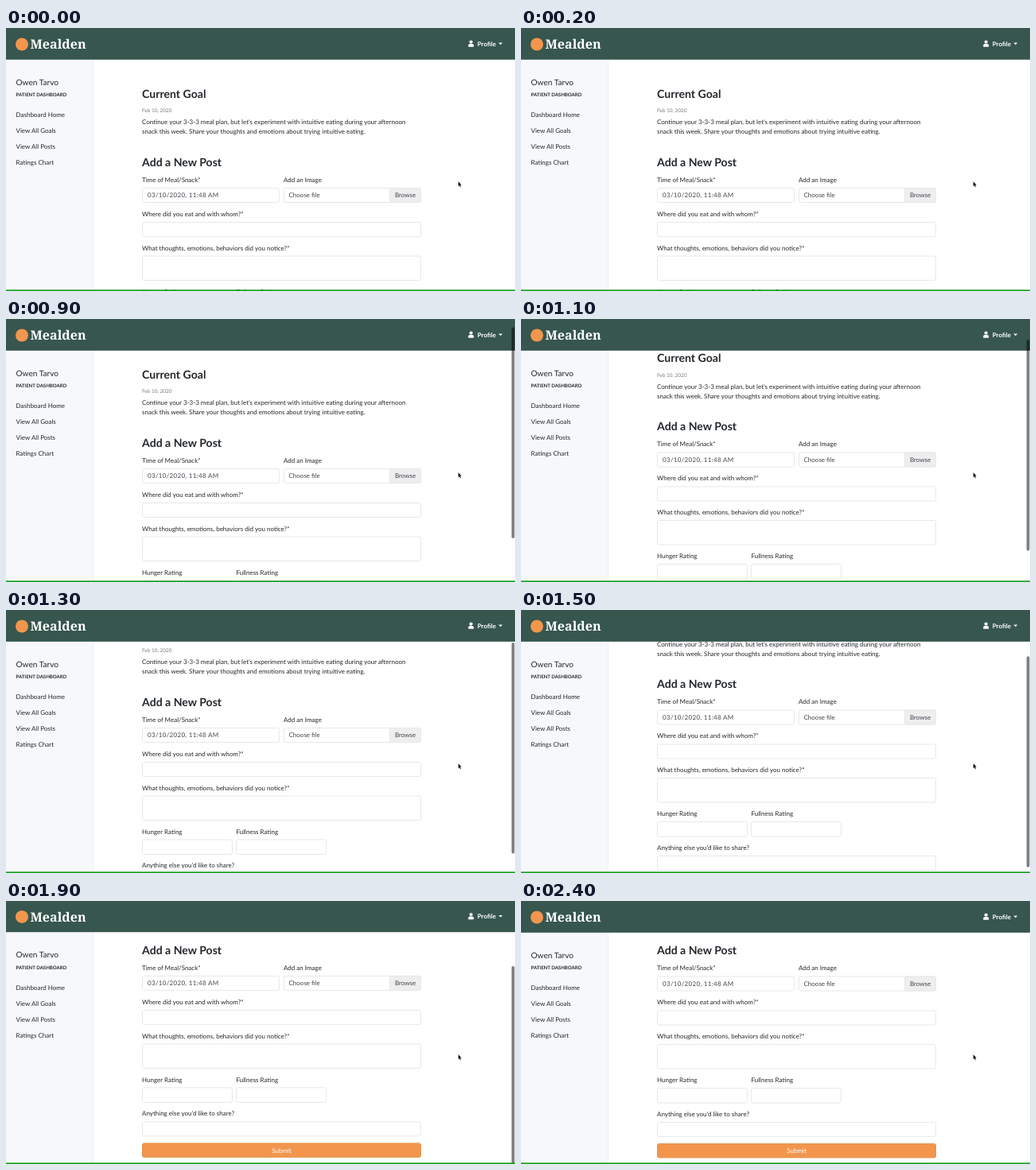
An HTML page with a canvas for the animation above (2600 ms loop, 640x331 px).

```html
<!DOCTYPE html>
<html lang="en">
<head>
<meta charset="utf-8">
<title>Patient dashboard</title>
<style>
  html, body { margin: 0; width: 100%; height: 100%; overflow: hidden; background: #fff; }
  canvas { display: block; width: 640px; height: 331px; }
</style>
</head>
<body>
<canvas id="stage"></canvas>
<script>
const W = 640, H = 331, LOOP = 2600, STEP = 100;
const REM = 8;
const VIEW = 347, MAX_SCROLL = 106.5;
const INK = '#24282c', MUTED = '#40464c', LINE = '#e6e8ea';
const ORANGE = '#f2964e', GREEN = '#36564e';

const canvas = document.getElementById('stage');
const ctx = canvas.getContext('2d');
const dpr = window.devicePixelRatio || 1;
canvas.width = W * dpr;
canvas.height = H * dpr;
ctx.textRendering = 'geometricPrecision';

// Scroll path: time, position, speed per step
const path = [
  [600, 0, 0], [700, 1, 2], [1100, 33.5, 10.5],
  [1500, 75.5, 13.5], [1700, MAX_SCROLL, 15]
];

function scrollAt(t) {
  if (t <= path[0][0]) return 0;
  for (let i = 1; i < path.length; i++) {
    const [t0, p0, v0] = path[i - 1], [t1, p1, v1] = path[i];
    if (t > t1) continue;
    const n = (t1 - t0) / STEP, u = (t - t0) / (t1 - t0), w = 1 - u;
    return w * w * ((1 + 2 * u) * p0 + u * n * v0) +
           u * u * ((1 + 2 * w) * p1 - w * n * v1);
  }
  return MAX_SCROLL;
}

// Elastic overshoot at the end of the page
function bounceAt(t) {
  return t < 1700 || t >= 2400 ? 0 : 2 * Math.exp((1700 - t) / 170);
}

function barAlpha(t) {
  return t < 800 ? 0 : Math.max(0, Math.min(1, (2400 - t) / 300));
}

// y is the middle of the capital letters
function text(str, x, y, { size = REM, color = INK, weight = 400,
    family = 'Lato, sans-serif', align = 'left', spacing = 0 } = {}) {
  ctx.font = `${weight} ${size}px ${family}`;
  ctx.fillStyle = color;
  ctx.textAlign = align;
  ctx.letterSpacing = spacing + 'px';
  ctx.fillText(str, x, y + size * 0.36);
}

function rect(x, y, w, h, color) {
  ctx.fillStyle = color;
  ctx.fillRect(x, y, w, h);
}

function box(x, y, w, h, fill = '#fff', stroke = LINE) {
  ctx.beginPath();
  ctx.roundRect(x + 0.5, y + 0.5, w - 1, h - 1, 2);
  ctx.fillStyle = fill;
  ctx.fill();
  ctx.lineWidth = 1;
  ctx.strokeStyle = stroke;
  ctx.stroke();
}

function polygon(points, fill, stroke) {
  ctx.beginPath();
  points.forEach(([x, y]) => ctx.lineTo(x, y));
  ctx.closePath();
  if (stroke) {
    ctx.lineWidth = 1.2;
    ctx.strokeStyle = stroke;
    ctx.stroke();
  }
  ctx.fillStyle = fill;
  ctx.fill();
}

function disc(x, y, r, color) {
  ctx.beginPath();
  ctx.arc(x, y, r, 0, Math.PI * 2);
  ctx.fillStyle = color;
  ctx.fill();
}

function drawMain() {
  const title = { size: 14.1, weight: 700 };
  text('Current Goal', 171, 82.9, title);
  text('Feb 10, 2020', 171, 103.8, { size: 6.45, color: '#787c80' });
  text("Continue your 3-3-3 meal plan, but let's experiment with intuitive eating during your afternoon", 171, 118.5);
  text('snack this week. Share your thoughts and emotions about trying intuitive eating.', 171, 130.5);

  text('Add a New Post', 171, 168.7, title);
  text('Time of Meal/Snack*', 171, 190.9);
  text('Add an Image', 349, 190.9);
  box(171, 201, 173, 19);
  text('03/10/2020, 11:48 AM', 178, 210.6, { color: MUTED, spacing: 0.3 });
  box(349, 201, 173, 19);
  box(482, 201, 40, 19, '#eeeeef');
  text('Choose file', 355.5, 210.6, { color: MUTED });
  text('Browse', 502, 210.6, { color: MUTED, align: 'center' });

  text('Where did you eat and with whom?*', 171, 233.9);
  box(171, 244, 351, 19);
  text('What thoughts, emotions, behaviors did you notice?*', 171, 276.9);
  box(171, 286.5, 351, 31.5);

  text('Hunger Rating', 171, 331.8);
  text('Fullness Rating', 289.5, 331.8);
  box(171, 341.5, 114, 19.5);
  box(289, 341.5, 114, 19.5);
  text("Anything else you'd like to share?", 171, 374.5);
  box(171, 384.5, 351, 19);

  box(171, 411.5, 351, 18.5, ORANGE, '#e3944f');
  text('Submit', 346.5, 421, { color: '#fff', align: 'center' });
}

function drawSidebar() {
  rect(0, 39, 109, H, '#f7f8fa');
  rect(109, 39, 1, H, '#eeeff1');
  text('Owen Tarvo', 12.5, 68.3, { size: 10.1 });
  text('PATIENT DASHBOARD', 12.5, 84.3, { size: 6.05, weight: 700 });
  ['Dashboard Home', 'View All Goals', 'View All Posts', 'Ratings Chart']
    .forEach((item, i) => text(item, 12.5, 109.3 + i * 20.05));
}

function drawHeader() {
  rect(0, -4, W, 43.8, GREEN);
  disc(20, 20.5, 8, ORANGE);
  text('Mealden', 30.5, 20.5, { size: 16.1, weight: 700, color: '#fff', family: '"Noto Serif", serif' });

  disc(584.7, 17.6, 2.1, '#fff');
  ctx.beginPath();
  ctx.roundRect(581.2, 20, 7, 3.8, [2, 2, 0.8, 0.8]);
  ctx.fill();
  text('Profile', 592.7, 20.2, { weight: 700, color: '#fff' });
  polygon([[619.3, 18.6], [624.3, 18.6], [621.8, 21.2]], '#fff');
}

function drawScrollbar(scroll, alpha) {
  if (!alpha) return;
  const ratio = VIEW / (VIEW + MAX_SCROLL);
  ctx.globalAlpha = alpha;
  ctx.beginPath();
  ctx.roundRect(635.7, 0.5 + scroll * ratio, 3.7, VIEW * ratio, 1.8);
  ctx.fillStyle = 'rgba(0,0,0,0.5)';
  ctx.fill();
  ctx.globalAlpha = 1;
}

function drawCursor() {
  polygon([[568.7, 193.2], [568.7, 199.3], [570, 198.1], [571, 200.3],
    [572, 199.8], [571, 197.7], [572.7, 197.6]], '#111', '#fff');
}

function draw(now) {
  const t = Math.floor((now % LOOP) / STEP) * STEP;
  const scroll = scrollAt(t), bounce = bounceAt(t);
  ctx.setTransform(dpr, 0, 0, dpr, 0, 0);
  rect(0, 0, W, H, '#fff');

  ctx.save();
  ctx.translate(0, -bounce);
  ctx.save();
  ctx.translate(0, -scroll);
  drawMain();
  ctx.restore();
  drawSidebar();
  drawHeader();
  ctx.restore();

  drawScrollbar(scroll, barAlpha(t));
  drawCursor();
  rect(0, 329.4, W, 1.6, '#129c16');
}

let start;
function tick(now) {
  if (start === undefined) start = now;
  draw(now - start);
  requestAnimationFrame(tick);
}
draw(0);
requestAnimationFrame(tick);
</script>
</body>
</html>
```
